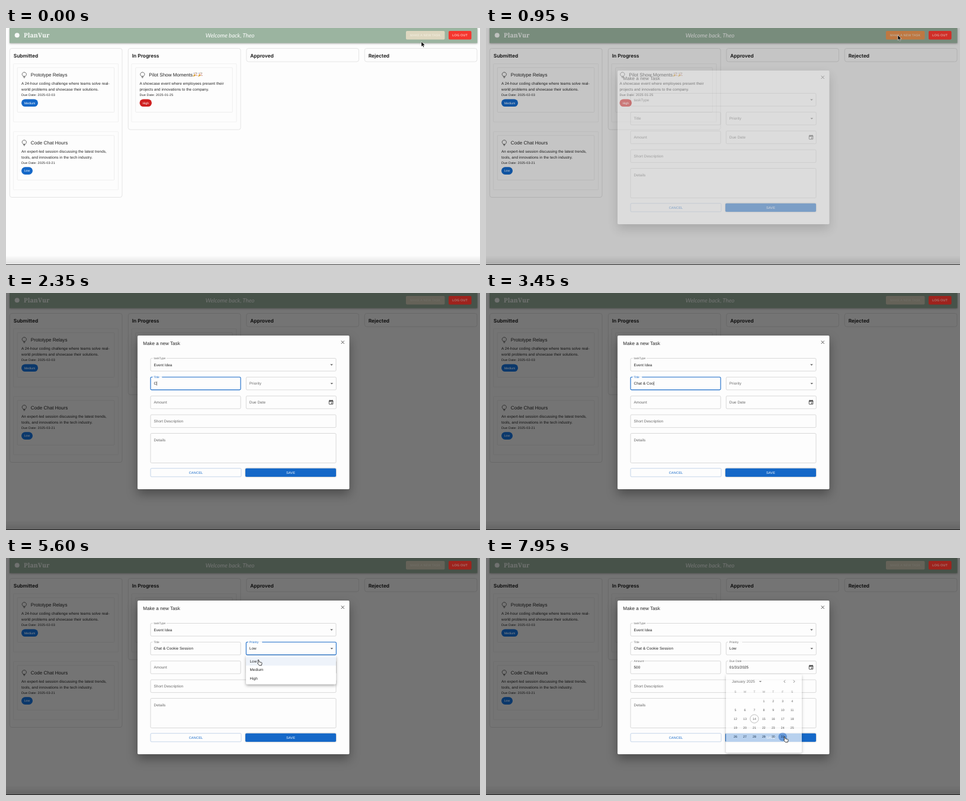
These frames come from a looping animation (800x401 px, 8000 ms). An HTML page:

```html
<!DOCTYPE html>
<html lang="en">
<head>
<meta charset="utf-8">
<title>Task board</title>
<style>
  html, body { margin: 0; width: 100%; height: 100%; overflow: hidden; background: #fdfdfd; }
  svg { display: block; width: 100vw; height: 100vh; }
  text { font-family: "Liberation Sans", Arial, sans-serif; white-space: pre; text-rendering: geometricPrecision; }
  .head { font: 600 8.4px Inter, sans-serif; }
  .brand { font: 600 10.5px "Noto Serif", serif; }
  .hello { font: italic 400 9.7px Lato, cursive; }
  .modal { filter: drop-shadow(0 8px 9px rgba(0,0,0,.35)); }
  .popup { filter: drop-shadow(0 2px 2.5px rgba(0,0,0,.35)); }
</style>
</head>
<body>
<svg id="stage" viewBox="0 0 800 401" preserveAspectRatio="none">
  <g id="board"></g>
  <g id="live"></g>
</svg>
<script>
const LOOP = 8000, STEP = 50;
const BLUE = '#1568c8', INK = '#222';

const clamp = v => Math.max(0, Math.min(1, v));
const mix = (a, b, p) => a + (b - a) * p;
const ease = p => p * p * (3 - 2 * p);
const ramp = (t, start, span) => ease(clamp((t - start) / span));
const during = (t, [a, b]) => t >= a && t < b;
const shade = (from, to, p) => `rgb(${from.map((v, i) => Math.round(mix(v, to[i], p)))})`;

const rect = (x, y, w, h, fill, extra = '') =>
  `<rect x="${x}" y="${y}" width="${w}" height="${h}" fill="${fill}" ${extra}/>`;
const outline = (x, y, w, h, stroke, r = 2, sw = .6) =>
  rect(x, y, w, h, 'none', `rx="${r}" stroke="${stroke}" stroke-width="${sw}"`);
const text = (x, y, s, size, fill = INK, extra = '') =>
  `<text x="${x}" y="${y}" font-size="${size}" fill="${fill}" ${extra}>${s}</text>`;
const path = (d, extra) => `<path d="${d}" ${extra}/>`;
const group = (body, extra) => `<g ${extra}>${body}</g>`;
const line = (d, color, w) => path(d, `fill="none" stroke="${color}" stroke-width="${w}"`);
const MID = 'text-anchor="middle"';
const CAPS = MID + ' letter-spacing=".16"';

/* ---- board ---- */
const columns = [
  { x: 6, title: 'Submitted', h: 252 },
  { x: 206, title: 'In Progress', h: 137.5 },
  { x: 405.5, title: 'Approved', h: 22.5 },
  { x: 605, title: 'Rejected', h: 22.5 }
];
const cards = [
  { x: 12.5, y: 60.5, title: 'Prototype Relays', due: '2025-02-03', level: 'Medium', chip: 28, color: BLUE,
    lines: ['A 24-hour coding challenge where teams solve real-', 'world problems and showcase their solutions.'] },
  { x: 12.5, y: 175.3, title: 'Code Chat Hours', due: '2025-03-21', level: 'Low', chip: 19, color: BLUE,
    lines: ['An expert-led session discussing the latest trends,', 'tools, and innovations in the tech industry.'] },
  { x: 212, y: 60.5, title: 'Pilot Show Moments', due: '2025-01-25', level: 'High', chip: 20.5, color: '#cf2020',
    lines: ['A showcase event where employees present their', 'projects and innovations to the company.'], party: true }
];

function bulb(x, y) {
  return line(`M${x - 1.7} ${y + 2.2}C${x - 5.2} ${y - .4} ${x - 3.4} ${y - 4.6} ${x} ${y - 4.6}` +
    `S${x + 5.2} ${y - .4} ${x + 1.7} ${y + 2.2}ZM${x - 1.6} ${y + 3.4}h3.2M${x - 1} ${y + 4.6}h2`, '#444', .8);
}

function popper(x, y) {
  return path(`M${x} ${y + 7}l2.2-5 3 3z`, 'fill="#d9a441"') +
    line(`M${x + 3} ${y + 1.8}q.2-1.6 1.4-2M${x + 4.6} ${y + 3}l2.6-2M${x + 5.4} ${y + 4.6}l2.2.4`, '#b8574b', .8) +
    `<circle cx="${x + 1.4}" cy="${y + .8}" r=".6" fill="#5b86b5"/><circle cx="${x + 6}" cy="${y + .2}" r=".6" fill="#6b9b64"/>`;
}

const chip = c => rect(c.x + 13.5, c.y + 60, c.chip, 12.6, c.color, 'rx="6.3"') +
  text(c.x + 13.5 + c.chip / 2, c.y + 68.1, c.level, 5.2, '#fff', MID);

function card(c) {
  const x = c.x + 13.5;
  return outline(c.x, c.y, 177, 98.5, '#e9e9e9', 1) +
    outline(c.x + 6.7, c.y + 6.5, 163.5, 75.5, '#e3e3e3', 1) +
    bulb(c.x + 18.3, c.y + 19) +
    text(c.x + 29.3, c.y + 21.8, c.title, 8.1) +
    c.lines.map((s, i) => text(x, c.y + 35.7 + i * 9.5, s, 6.33, INK, 'letter-spacing=".06"')).join('') +
    text(x, c.y + 54.4, 'Due Date: ' + c.due, 5.4, INK, 'letter-spacing=".18"') +
    (c.party ? popper(315.5, 75.5) + popper(324, 75.5) : '');
}

const logout = rect(747, 5, 38.5, 14.5, '#f5362e', 'rx="2"') + text(766.2, 14.1, 'LOG OUT', 5.5, '#fff', CAPS);

function newTask(hover) {
  return rect(675, 5, 65.5, 14.5, shade([222, 215, 192], [245, 155, 85], hover), 'rx="2"') +
    text(707.7, 14.1, 'MAKE A NEW TASK', 5.4, '#f4f0e2', CAPS);
}

document.getElementById('board').innerHTML =
  `<defs><linearGradient id="fade" x2="0" y2="1"><stop stop-opacity="0"/><stop offset="1" stop-opacity=".12"/></linearGradient></defs>` +
  rect(0, 0, 800, 401, '#fdfdfd') + rect(0, 385, 800, 15, 'url(#fade)') + rect(0, 400, 800, 1, '#444') +
  rect(6, 0, 789.5, 25.5, '#9bb4a0', 'style="filter:drop-shadow(0 1px 1.5px rgba(0,0,0,.3))"') +
  '<circle cx="18.7" cy="12.2" r="4" fill="#f6f8f6"/>' +
  text(30, 15.7, 'PlanVur', 10.5, '#f8faf8', 'class="brand"') +
  text(378, 15.8, 'Welcome back, Theo', 9.7, '#fff', 'class="hello" ' + MID) +
  columns.map(c => outline(c.x + .3, 34.5, 189.7, c.h, '#dadada', 3.5, .7) +
    text(c.x + 6.7, 50.3, c.title, 8.4, '#111', 'class="head"')).join('') +
  cards.map(card).join('');

/* ---- form ---- */
const TITLE = 'Chat & Cookie Session';
const escape = s => s.replace('&', '&amp;');
const typed = (s, t, start, gap) => t < start ? '' : s.slice(0, 1 + Math.floor((t - start) / gap));

const menus = [
  { x: 244, y: 133, w: 313, items: ['Event Idea', 'Expense'], open: 1300, pick: 1850, hover: 1650 },
  { x: 405, y: 165, w: 152, items: ['Low', 'Medium', 'High'], open: 5250, pick: 5600, hover: 5450 }
];
const CAL = { open: 7150, pick: 7850, close: 7870 };

const fields = [
  { label: 'taskType', x: 244, y: 110.5, w: 313, focus: [1300, 2100], menu: menus[0], value: t => t >= 1850 ? 'Event Idea' : '' },
  { label: 'Title', x: 244, y: 142.3, w: 152, focus: [2100, 5250], caret: true, value: t => typed(TITLE, t, 2300, 126) },
  { label: 'Priority', x: 405.3, y: 142.3, w: 152, focus: [5250, 5950], menu: menus[1], value: t => t >= 5600 ? 'Low' : '' },
  { label: 'Amount', x: 244, y: 174.2, w: 152, focus: [5950, 6600], caret: true, value: t => typed('500', t, 6150, 120) },
  { label: 'Due Date', x: 405.3, y: 174.2, w: 152, focus: [6600, 7150], date: true,
    value: t => t < 6600 ? '' : t < CAL.pick ? 'MM/DD/YYYY' : '01/31/2025' },
  { label: 'Short Description', x: 244, y: 206, w: 313 },
  { label: 'Details', x: 244, y: 237.5, w: 313, h: 50 }
];

function field(f, t) {
  const focused = f.focus && during(t, f.focus);
  const lift = f.focus ? ramp(t, f.focus[0], 150) : 0;
  const left = f.x + 5.5;
  let out = outline(f.x, f.y, f.w, f.h || 21.6, focused ? BLUE : '#c2c2c2', 1.8, focused ? 1.1 : .6);
  if (lift) out += rect(f.x + 3.5, f.y - 1, (f.label.length * 2.55 + 3) * lift, 2, '#fdfdfd');
  out += text(left, mix(f.y + 13, f.y + 1.7, lift), f.label, mix(6.35, 4.8, lift),
    focused ? BLUE : '#666', 'letter-spacing=".06"');
  if (f.date && focused) out += rect(left - .2, f.y + 6.8, 10.8, 8, '#7f9cd0');
  const value = f.value ? f.value(t) : '';
  const caret = f.caret && focused ? '<tspan dx="-.6" font-size="7.4" font-weight="100">|</tspan>' : '';
  if (value || caret) out += text(left, f.y + 13, escape(value) + caret, 6.35, INK, 'letter-spacing=".06"');
  if (f.menu) {
    const s = during(t, [f.menu.open, f.menu.pick]) ? -1 : 1;
    out += path(`M${f.x + f.w - 9.8} ${f.y + 11 - s * 1.1}h4.6l-2.3 ${2.3 * s}z`, 'fill="#555"');
  }
  if (f.date) out += outline(545.3, 182, 6.6, 6.3, '#444', .6, .9) + rect(545.3, 181.8, 6.6, 2, '#444') +
    rect(548.7, 185.4, 2, 1.8, '#444') + line('M546.8 180.7v1.6M550.4 180.7v1.6', '#444', .8);
  return out;
}

const visible = (t, open, close) => ramp(t, open, 230) * (1 - ramp(t, close, 220));

function menu(m, t) {
  const p = visible(t, m.open, m.pick);
  if (!p) return '';
  const h = 5.5 + m.items.length * 14.4;
  const body = rect(m.x, m.y, m.w, h, '#fff', 'rx="1.8"') +
    (t >= m.hover ? rect(m.x, m.y + 2.7, m.w, 14.4, '#eef3fa') : '') +
    m.items.map((s, i) => text(m.x + 6.5, m.y + 12 + i * 14.4, s, 6.35, INK, 'letter-spacing=".06"')).join('');
  const cx = m.x + m.w / 2;
  return group(body, `class="popup" opacity="${p}" transform="translate(${cx} ${m.y}) ` +
    `scale(${mix(.9, 1, p)} ${mix(.75, 1, p)}) translate(${-cx} ${-m.y})"`);
}

function calendar(t) {
  const p = visible(t, CAL.open, CAL.close);
  if (!p) return '';
  const col = i => 421 + i * 15.95;
  let out = rect(405, 197, 128, 132.5, '#fff', 'rx="1.8"') +
    text(415, 211.2, 'January 2025', 6.3, '#333', 'letter-spacing=".06"') +
    path('M460.8 208h4.4l-2.2 2.2z', 'fill="#555"') +
    line('M505 206.6l-2.2 2.2 2.2 2.2M518.8 206.6l2.2 2.2-2.2 2.2', '#444', .9) +
    [...'SMTWTFS'].map((d, i) => text(col(i), 227.8, d, 4.9, '#666', MID)).join('') +
    `<circle cx="${col(2)}" cy="272.1" r="7.1" fill="none" stroke="#666" stroke-width=".6"/>`;
  for (let day = 1; day <= 31; day++) {
    const cell = day + 2, x = col(cell % 7), y = 241.8 + Math.floor(cell / 7) * 15.2;
    if (day === 31 && t >= 7700)
      out += `<circle cx="${x}" cy="${y}" r="7.2" fill="${t >= CAL.pick ? '#86ace0' : '#dbe7f6'}"/>`;
    out += text(x, y + 1.8, day, 5.2, '#111', MID);
  }
  return group(out, `class="popup" opacity="${p}"`);
}

function dialog(t, p) {
  const body = group(rect(222, 72, 357.5, 260, '#fdfdfd', 'rx="1.8"'), 'class="modal"') +
    text(231.3, 87.7, 'Make a new Task', 8.1) +
    line('M565.7 80.8l5.2 5.2M570.9 80.8l-5.2 5.2', '#444', .9) +
    fields.map(f => field(f, t)).join('') +
    outline(244, 296.7, 153, 14.2, '#9fb9dc', 1.8) + text(320.5, 305.6, 'CANCEL', 5.6, BLUE, CAPS) +
    rect(404, 296.7, 153, 14.4, BLUE, 'rx="1.8" style="filter:drop-shadow(0 .8px .8px rgba(0,0,0,.35))"') +
    text(480.5, 305.9, 'SAVE', 5.6, '#fff', CAPS);
  return group(body, `opacity="${p}"`);
}

/* ---- pointer: time, x, y ---- */
const track = [
  [0, 701, 23], [300, 703, 12], [600, 697, 12], [850, 695, 12], [980, 695, 12], [1260, 362, 119], [1520, 362, 119],
  [1700, 290, 141], [1880, 290, 141], [2080, 300, 154], [4950, 300, 154], [5200, 470, 152], [5300, 470, 152],
  [5500, 425, 172], [5650, 425, 172], [5900, 300, 185], [6380, 300, 185], [6580, 461, 189], [6800, 461, 189],
  [7080, 548, 184], [7250, 548, 184], [7600, 503, 302], [8000, 503, 302]
];
const hidden = [[2250, 4950], [6100, 6400]];
const beams = [[2030, 2250], [4950, 5050], [5850, 6980]];
const hands = [[1650, 1950], [5120, 5300], [5450, 5700], [6980, 7300], [7450, 8000]];
const any = (spans, t) => spans.some(s => during(t, s));

function pointer(t) {
  if (any(hidden, t)) return '';
  const i = track.findIndex(k => k[0] > t), [a, b] = [track[i - 1], track[i]];
  const p = ramp(t, a[0], b[0] - a[0]);
  const at = `transform="translate(${mix(a[1], b[1], p)} ${mix(a[2], b[2], p)})"`;
  if (any(beams, t)) {
    const d = 'M-2-5.5q2 0 2 1.5v8q0 1.5-2 1.5M2-5.5q-2 0-2 1.5v8q0 1.5 2 1.5M-1 1h2';
    return group(line(d, '#fff', 1.8) + line(d, '#111', .9), at);
  }
  if (any(hands, t))
    return group(path('M.2 1q.2-1.4 1.4-.4l.9 3.4 3.2.5q1.5.4 1.3 2l-.8 3.2H2.4L-.2 6.6q-.6-1.3.8-1z',
      'fill="#fff" stroke="#111" stroke-width=".8" stroke-linejoin="round"'), at);
  return group(path('M0 0v8.6l2-1.8 1.3 3 1.5-.7-1.3-2.9h2.7z', 'fill="#000" stroke="#fff" stroke-width=".6"'), at);
}

const live = document.getElementById('live');

function draw(t) {
  const p = ramp(t, 850, 225);
  const hover = ramp(t, 150, 150) * (1 - ramp(t, 1000, 150));
  const chips = cards.map(chip).join('');
  let out = newTask(hover) + logout + chips;
  // Saturated colours stay a little brighter than the rest under the backdrop.
  if (p) out += rect(0, 0, 800, 401, '#000', `opacity="${p * .54}"`) +
    group(logout, 'opacity=".35"') + group(chips, 'opacity=".15"') + dialog(t, p);
  live.innerHTML = out + menus.map(m => menu(m, t)).join('') + calendar(t) + pointer(t);
}

const begin = performance.now();
let shown = -1;
function tick() {
  const t = Math.floor(((performance.now() - begin) % LOOP) / STEP) * STEP;
  if (t !== shown) draw(shown = t);
  requestAnimationFrame(tick);
}
tick();
</script>
</body>
</html>
```
